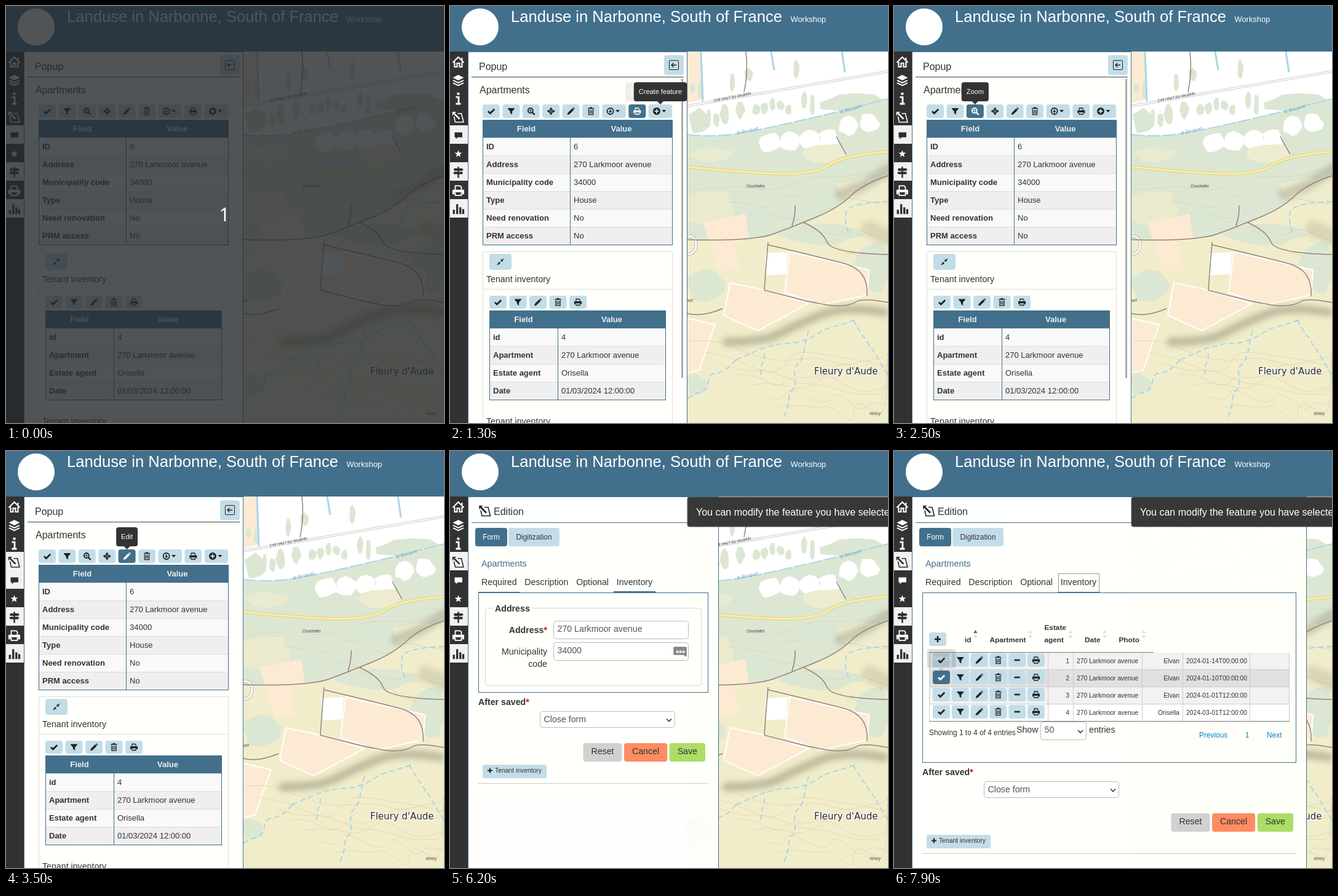
An HTML page that plays this animation: 712 by 678 pixels, repeating every 8 s.

```html
<!DOCTYPE html>
<html lang="en">
<head>
<meta charset="utf-8">
<title>Map editor</title>
<style>
html, body { margin: 0; width: 100%; height: 100%; overflow: hidden; background: #fff; }
svg { display: block; width: 100%; height: 100%; font-family: "Liberation Sans", Arial, sans-serif; }
text { white-space: pre; }
.map text { font-family: "Open Sans", "Noto Sans", sans-serif; font-style: italic; }
.map .town { font-family: "DejaVu Sans", sans-serif; font-style: normal; }
.ln { fill: none; stroke: currentColor; }
.btn { color: #222; }
.btn > rect { fill: #c3dde8; }
.btn.on { color: #fff; }
.btn.on > rect { fill: #42708c; }
.side { color: #fff; }
.side > rect { fill: none; }
.side.on { color: #2d2d2d; }
.side.on > rect { fill: #f1f1f1; }
</style>
</head>
<body>
<svg id="stage" viewBox="0 0 712 678"></svg>
<script>
const TEAL = '#42708c', LIGHT = '#c3dde8', INK = '#333', BASE = 14.2;
const ADDRESS = '270 Larkmoor avenue';
const END = 'text-anchor="end"', MID = 'text-anchor="middle"';

// ---- drawing helpers
const rect = (x, y, w, h, fill, extra = '') =>
  `<rect x="${x}" y="${y}" width="${w}" height="${h}" fill="${fill}" ${extra}/>`;
const frame = (x, y, w, h, stroke, r = 0, fill = 'none') =>
  rect(x + .5, y + .5, w - 1, h - 1, fill, `stroke="${stroke}" rx="${r}"`);
const text = (x, y, str, size = 13, fill = INK, extra = '') =>
  `<text x="${x}" y="${y}" font-size="${size}" fill="${fill}" ${extra}>${str}</text>`;
const bold = (x, y, str, size, fill, extra = '') =>
  text(x, y, str, size, fill, 'font-weight="bold" ' + extra);
const path = (d, fill, stroke = 'none', w = 1, extra = '') =>
  `<path d="${d}" fill="${fill}" stroke="${stroke}" stroke-width="${w}" ${extra}/>`;
const hline = (x1, x2, y, stroke, w = 1, extra = '') => rect(x1, y, x2 - x1, w, stroke, extra);
const group = (id, body) => `<g id="${id}">${body}</g>`;

const pen = document.createElement('canvas').getContext('2d');
function widthOf(str, size, weight = '') {
  pen.font = `${weight} ${size}px "Liberation Sans", Arial, sans-serif`;
  return pen.measureText(str).width;
}

// Smooth line through the midpoints of "x,y x,y ..."
function curve(pts) {
  const p = pts.split(' ').map(s => s.split(',').map(Number)), n = p.length;
  let d = 'M' + p[0];
  for (let i = 1; i < n - 1; i++) {
    const q = p[i], r = p[i + 1];
    d += `Q${q} ${i < n - 2 ? [(q[0] + r[0]) / 2, (q[1] + r[1]) / 2] : r}`;
  }
  return n === 2 ? d + 'L' + p[1] : d;
}
const trail = (pts, stroke, w, extra) => path(curve(pts), 'none', stroke, w, extra);
const poly = (pts, fill, stroke, w) => path('M' + pts.split(' ').join('L') + 'Z', fill, stroke, w);
const between = (a, b, fill) => path(curve(a) + curve(b.split(' ').reverse().join(' ')).replace('M', 'L') + 'Z', fill);

let seed = 11;
const rnd = () => (seed = seed * 16807 % 2147483647) / 2147483647;

// Ellipse with an uneven rim
function patch(x, y, rx, ry, fill) {
  let d = '';
  for (let a = 0; a < 12; a++) {
    const k = .8 + rnd() * .4, t = a * Math.PI / 6;
    d += (a ? 'L' : 'M') + (x + rx * k * Math.cos(t)).toFixed(1) + ' ' + (y + ry * k * Math.sin(t)).toFixed(1);
  }
  return path(d + 'Z', fill, fill, 3, 'stroke-linejoin="round"');
}

// Line between two points that wanders sideways
function wander(x1, y1, x2, y2, amp) {
  const pts = [];
  for (let i = 0; i <= 8; i++) {
    const k = i / 8, side = (rnd() - .5) * 2 * amp * Math.sin(Math.PI * k);
    pts.push(`${x1 + (x2 - x1) * k + side / 2},${y1 + (y2 - y1) * k + side}`);
  }
  return pts.join(' ');
}

// ---- icons, centred on 0,0
const ln = (d, w = 1.6) => `<path class="ln" d="${d}" stroke-width="${w}"/>`;
const solid = d => `<path fill="currentColor" fill-rule="evenodd" d="${d}"/>`;
const ring = (r, w, at = 0) => `<circle class="ln" cx="${at}" cy="${at}" r="${r}" stroke-width="${w}"/>`;
const spin = (n, body) => Array.from({ length: n }, (_, i) => `<g transform="rotate(${i * 360 / n})">${body}</g>`).join('');
const withCaret = body => `<g transform="translate(-6)">${body}${solid('M8.5-2h7l-3.5 4Z')}</g>`;
const ICON = {
  check: ln('M-5 .3L-1.6 3.6L5.2-3.2', 2.8),
  filter: solid('M-5.5-5h11v1L1.6 .5v5L-1.6 3V.5L-5.5-4Z'),
  zoom: ring(4, 1.9, -1) + ln('M2 2L5.8 5.8', 2.4) + ln('M-3-1H1M-1-3V1', 1.2),
  target: spin(4, solid('M0-6.5L2.4-3.6H-2.4Z')) + ring(2.9, 1.4) + ln('M0-5V5M-5 0H5', 1.2),
  pencil: solid('M-6 6l1-3.6l7-7L4.6-2l-7 7ZM2.7-5.3l1.3-1L6.3-4l-1 1.3Z'),
  trash: ln('M-5-4.5H5M-2-5.8H2M-3.6-3V5.6H3.6V-3M-1.3-2V4M1.3-2V4', 1.3),
  clock: withCaret(ring(5, 1.8) + ln('M0-3V1M-2 0L0 2L2 0', 1.4)),
  print: ln('M-3-2V-5H2L3-4V-2M-3 3V5H3V3', 1.3) + solid('M-6-1.5H6v5H4V2H-4v1.5H-6Z'),
  add: withCaret(ring(3, 6) + '<path d="M-3.4 0H3.4M0-3.4V3.4" stroke="#c3dde8" stroke-width="2"/>'),
  minus: ln('M-4.5 0H4.5', 2.6),
  plus: ln('M-5 0H5M0-5V5', 2.6),
  shrink: spin(2, solid('M.4-.4L.8-4.5L2.2-3.2L4.6-5.6l1 1L3.2-2.2L4.5-.8Z')),
  home: ln('M-9 1L0-8L9 1M6-7V-3M-6 0V8H-2V2H2V8H6V0', 2.1),
  layers: solid('M0-9l9 4.5L0 0l-9-4.5Z') + ln('M-8.5 0L0 4L8.5 0M-8.5 4.2L0 8.2L8.5 4.2', 2.1),
  info: solid('M-2-10h4v3.7h-4Z') + ln('M-4-2.7H.5V8M-4 8.2H4', 2.8),
  edit: ln('M-1-6H5L8.5 8H-5L-7-1', 1.6) + ln('M-8.5-7.5L2 3', 2.6) + ln('M-9-3V-8H-4', 1.4),
  chat: solid('M-6-5H6.5V3H-1L-4 6V3H-6Z'),
  star: spin(5, solid('M0-6.3L1.7-1.5L0 1L-1.7-1.5Z')),
  sign: ln('M0-9V9', 2.4) + solid('M-7-6.5H6l2.5 2L6-2.5H-7ZM7-.8H-6l-2.5 2l2.5 2H7Z'),
  printer: ln('M-5-1V-8H3l2 2V-1M-5 3V7.5H5V3', 1.8) + solid('M-9.5-1.5h19V6H6V2.5H-6V6H-9.5Z'),
  bars: ln('M-7.2 8V1M-1.8 8V-8M3.3 8V-3M8 8V0', 3.3)
};
const icon = (name, x, y, k = 1) => `<g transform="translate(${x} ${y}) scale(${k})">${ICON[name]}</g>`;
const button = (x, y, w, h, name, id = '') =>
  `<g class="btn" id="${id}">${rect(x, y, w, h, LIGHT, 'rx="4"')}${icon(name, x + w / 2, y + h / 2)}</g>`;

// ---- background map
function map() {
  const GREEN = '#dce7d3', CREAM = '#f1edcb', PEACH = '#fdead3', PATH = '#93827f', BLUE = '#a9d6e8';
  const river = '386,209 430,214 510,200 632,172 712,151';
  const road = '386,261 440,268 590,276 640,242 712,237';
  const lane = '386,380 492,383 560,358 632,328 670,290 712,276';
  let s = rect(30, 74, 682, 604, '#fff') + rect(386, 262, 326, 416, CREAM) + rect(30, 262, 356, 416, '#f8f6e4');
  s += poly('386,74 409,74 411,152 386,158', PEACH);

  // hedges on both sides of the diagonal street
  const streetY = x => 161 - (x - 386) * .172;
  for (let x = 394; x < 600; x += 13) {
    const side = rnd() < .5 ? -1 : 1;
    s += patch(x, streetY(x) + side * (18 + rnd() * 18), 2 + rnd() * 4, 6 + rnd() * 10, GREEN);
  }
  s += patch(405, 188, 16, 18, GREEN) + patch(660, 158, 55, 14, GREEN);

  // land between river, road and lane
  s += between(river, road, GREEN) + patch(425, 242, 36, 10, '#e9ebd0');
  for (let x = 520; x < 710; x += 32) s += patch(x, 240 - (x - 500) * .2 - rnd() * 16, 15, 14, '#fff');
  s += patch(610, 240, 32, 14, '#eeecd0');
  s += between(road, lane, GREEN) + patch(425, 330, 42, 28, '#eceacd') + patch(670, 300, 40, 18, '#eeedd0');
  s += patch(600, 372, 60, 16, GREEN) + patch(688, 425, 26, 44, GREEN) + patch(415, 452, 32, 24, GREEN) + patch(400, 615, 16, 16, GREEN);

  // fields
  s += poly('412,352 480,338 486,378 462,384 470,428 436,432', PEACH) + poly('512,402 549,400 546,436 514,438', '#fff');
  const field = pts => poly(pts, PEACH, '#fff', 2);
  s += field('552,400 681,429 678,470 604,486 544,466') + field('455,450 512,462 582,484 500,528 445,503') + field('386,508 431,518 405,592 386,596');

  // contour lines
  for (let i = 0; i < 7; i++)
    s += trail(wander(390 + i * 24, 545 + i * 18, 712, 570 + i * 16, 34) + (i % 2 ? '' : ' 712,560'), '#e6d8b3', 1);
  for (let i = 0; i < 4; i++) s += trail(wander(390 + i * 60, 300 + i * 18, 712, 262 + i * 60, 22), '#e3d6b0', 1);

  // shading along the ridges
  const ridge = (pts, w, o) => trail(pts, '#6f6a55', w, `opacity="${o}" stroke-linecap="round"`);
  s += '<g filter="url(#soft)">' + ridge('450,546 510,546 560,520 640,486 706,498', 14, .38) +
    ridge('635,306 670,296 712,266', 18, .28) + ridge('682,362 712,376', 26, .18) + '</g>';

  // water
  for (const c of ['408,74 411,155', '522,74 527,104', '637,74 642,108']) s += trail(c, BLUE, 3);
  s += trail(river, BLUE, 2, 'stroke-dasharray="22 3"');
  for (const c of [wander(386, 638, 465, 575, 8), wander(465, 575, 660, 510, 8), wander(543, 668, 584, 525, 10),
    wander(505, 600, 512, 560, 4), '712,318 648,320 640,350 650,374', wander(655, 510, 712, 600, 14)])
    s += trail(c, BLUE, 2, 'stroke-dasharray="9 5"');

  // roads
  const cased = (pts, edge, fill, w) => trail(pts, edge, w + 1.6) + trail(pts, fill, w);
  s += cased(road, '#d3c68b', '#f8ef9f', 3.4) + cased('386,404 400,402 400,374 386,374', '#aaa', '#fff', 3);
  s += path(`M386 161L712 ${streetY(712)}m0 3L386 164`, 'none', '#cfcac8', 1.1);
  for (const c of [lane, '481,74 485,108 478,140', '628,212 634,224 644,241', '556,358 562,338 561,324',
    '517,384 514,420 511,462', '516,388 600,408 681,429 678,472', '511,462 604,487 650,488 670,474 712,482',
    '386,500 410,506 443,492', '575,352 606,366 620,402 712,404']) s += trail(c, PATH, 1.5);

  // labels
  const label = (x, y, r, str, size, fill = INK) => text(x, y, str, size, fill, `transform="rotate(${r} ${x} ${y})"`);
  s += label(429, 156, -11, 'CHE HAUT DU VALBRIN', 6.2) + label(467, 209, -13, 'le Bouquet', 7.5, '#6aa0c8') +
    label(635, 175, -17, 'le Bouquet', 7.5, '#6aa0c8') + label(482, 295, 0, 'Coustades', 6.6) +
    label(682, 665, 0, 'Villory', 6.6) + label(386, 481, 0, 'set', 7);
  s += text(592, 599, "Fleury d'Aude", 15, '#2a2a33', 'class="town" stroke="#fff" stroke-width="2.5" stroke-opacity=".7" paint-order="stroke"');
  return `<g class="map">${s}</g>`;
}

// ---- page parts
const panel = (right, bottom) => rect(30, 75, right - 30, 603, '#fff', 'opacity=".88"') +
  rect(30, 117, right - 30, bottom - 117, '#fffffb', 'opacity=".8"') + frame(29, 74, right - 28, 610, TEAL);

function dataTable(x, y, w, split, data) {
  const rows = Object.entries(data), h = 29 * (rows.length + 1);
  let s = '';
  rows.forEach(([k, v], i) => {
    const top = y + 29 * (i + 1);
    s += rect(x, top, w, 29, i % 2 ? '#efefef' : '#f9f9f9') + hline(x, x + w, top, '#ddd');
    s += bold(x + 6, top + 19, k) + text(split + 6, top + 19, v);
  });
  s += rect(x, y, w, 29, TEAL) + rect(split, y, 1, h, TEAL) + frame(x, y, w, h + 1, TEAL);
  return s + bold((x + split) / 2, y + 19, 'Field', 13, '#eee', MID) + bold((split + x + w) / 2, y + 19, 'Value', 13, '#eee', MID);
}

// Main toolbar: icon, tooltip; menus with a caret are wider
const TOOLS = Object.entries({ check: 'Select', filter: 'Filter', zoom: 'Zoom', target: 'Center', pencil: 'Edit',
  trash: 'Delete', clock: 'Export', print: 'Print', add: 'Create feature' }).map(([name, tip]) =>
  ({ name, tip, w: ICON[name].includes('translate') ? 38.5 : 28 }));
TOOLS.reduce((x, b) => (b.x = x) + b.w + 4.4, 53);

const toolRow = (x, y, step, h, names, idOf = () => '') =>
  names.split(' ').map((n, i) => button(x + i * step, y, 28, h, n, idOf(i))).join('');

function popup() {
  let s = panel(385, 678) + text(47, 104, 'Popup', 16) + hline(35, 380, 115, '#444');
  s += rect(348, 80, 32, 32, LIGHT, 'rx="4"') + frame(356, 88, 16, 16, '#222', 1.5) + path('M368 96h-8m3.5-3.5l-3.5 3.5l3.5 3.5', 'none', '#222', 1.3);
  s += text(48, 142, 'Apartments', 16) + TOOLS.map(b => button(b.x, 160, b.w, 22, b.name, b.name)).join('');
  s += dataTable(53, 185, 309, 195, { ID: 6, Address: ADDRESS, 'Municipality code': 34000,
    Type: 'House', 'Need renovation': 'No', 'PRM access': 'No' });
  s += frame(53, 399, 309, 290, '#ddd') + button(64, 403, 36, 26, 'shrink');
  s += text(59, 449, 'Tenant inventory', BASE) + hline(54, 361, 460, '#ddd');
  s += toolRow(64, 471, 32.5, 21, 'check filter pencil trash print');
  s += dataTable(64, 495, 287, 175, { id: 4, Apartment: ADDRESS, 'Estate agent': 'Orisella', Date: '01/03/2024 12:00:00' });
  return s + text(59, 680, 'Tenant inventory', BASE) + rect(376, 118, 3, 487, '#aaa', 'rx="1.5" id="thumb"');
}

const star = '<tspan fill="#e00">*</tspan>';
const input = (x, y, w, h, str) => frame(x, y, w, h, '#bbb', 4, '#fff') + text(x + 6.5, y + 18, str, BASE, '#555');
const select = (x, y, w, h, str) => input(x, y, w, h, str) + path(`M${x + w - 14} ${y + h / 2 - 1}l4 4l4-4`, 'none', INK, 1.6);

// Lower part of the form, below its box
function formFoot(right, y) {
  let x = right - 5, s = '';
  for (const [str, fill] of [['Save', '#acdd66'], ['Cancel', '#fd8c62'], ['Reset', '#d1d1d1']]) {
    const w = widthOf(str, BASE) + 26;
    x -= w;
    s += rect(x, y + 82, w, 30, fill, 'rx="4"') + text(x + w / 2, y + 100, str, BASE, INK, MID);
    x -= 3.5;
  }
  return s + bold(46, y + 20, 'After saved' + star, BASE) + select(146, y + 30, 220, 27, 'Close form') +
    rect(53, y + 117, 104, 22, LIGHT, 'rx="3"') + `<g color="#222">${icon('plus', 65, y + 126.5, .8)}</g>` +
    text(73, y + 130, 'Tenant inventory', 10.35) + hline(46, right, y + 147, '#ccc');
}

// Tabs sit side by side; the line under a tab reaches 5px past its name
const TABS = ['Required', 'Description', 'Optional', 'Inventory'].map(name => ({ name, w: widthOf(name, BASE) }));
TABS.reduce((x, t) => (t.x = x) + t.w + 12.8, 51);
const underline = (i, y, id = '') => hline(TABS[i].x - 5, TABS[i].x + TABS[i].w + 5, y, TEAL, 2, `id="${id}"`);

const formHead = () => `<g color="#222">${icon('edit', 57, 97.5)}</g>` + text(71, 104, 'Edition', 16) + hline(35, 386, 116, TEAL) +
  rect(41, 125, 52, 30, TEAL, 'rx="4"') + text(67, 144, 'Form', 11.9, '#fff', MID) +
  rect(95, 125, 83, 30, LIGHT, 'rx="4"') + text(136.5, 144, 'Digitization', 11.9, INK, MID) +
  text(51, 188, 'Apartments', BASE + .2, TEAL) + TABS.map(t => text(t.x, 218, t.name, BASE)).join('');

function required() {
  return frame(46, 230, 374, 163, TEAL) + frame(57, 255, 352, 127, LIGHT, 4) + rect(69, 252, 65, 6, '#fefefb') +
    bold(73, 261, 'Address', BASE) + bold(158, 296, 'Address' + star, BASE, INK, END) + input(168, 276, 220, 30, ADDRESS) +
    text(158, 331, 'Municipality', BASE, INK, END) + text(158, 351, 'code', BASE, INK, END) + input(168, 311, 220, 30, '34000') +
    path('M364 319h20v15l-4-3h-16Z', '#888', '#666', 1, 'stroke-linejoin="round"') + bold(374.5, 333, '***', 13, '#fff', MID) +
    underline(0, 229) + formFoot(420, 393);
}

const ROWS = [['Elvan', '2024-01-14T00'], ['Elvan', '2024-01-10T00'], ['Elvan', '2024-01-01T12'], ['Orisella', '2024-03-01T12']];

function inventory() {
  let s = frame(46, 230, 608, 277, TEAL) + button(57, 295, 28, 22, 'plus'), x = 115;
  for (const head of ['id', 'Apartment', 'Estate agent', 'Date', 'Photo']) {
    const words = head.split(' ').reverse();
    words.forEach((w, i) => s += bold(x, 311 - i * 20, w, 11.8));
    const ax = x + Math.max(...words.map(w => widthOf(w, 11.8, 'bold'))) + 7;
    s += path(`M${ax - 3} 296l3-5l3 5Z`, head === 'id' ? '#555' : '#ddd') + path(`M${ax - 3} 300l3 5l3-5Z`, '#ddd');
    x = ax + 23;
  }
  ROWS.forEach(([agent, date], i) => {
    const y = 328 + i * 28;
    s += rect(57, y, 586, 28, '#fff', `id="row${i}"`) + hline(57, 643, y + 27, '#ccc');
    s += toolRow(63, y + 1, 30.8, 22, 'check filter pencil trash minus print', j => j ? '' : 'pick' + i);
    s += text(285, y + 17, i + 1, 10.3, INK, END) + text(297, y + 17, ADDRESS, 10.3) +
      text(464, y + 17, agent, 10.3, INK, END) + text(475, y + 17, date + ':00:00', 10.3);
  });
  for (const edge of [57, 250, 291, 403, 469, 578, 642]) s += rect(edge, 328, 1, 112, '#ccc');
  s += hline(57, 422, 327, '#777') + hline(57, 643, 439, '#777');
  s += text(57, 462, 'Showing 1 to 4 of 4 entries', 11.9) + text(199, 458, 'Show', BASE) +
    select(238, 440, 75, 30, '50') + text(317, 458, 'entries', BASE);
  s += text(496, 466, 'Previous', 11.9, '#08c') + text(571, 466, '1', 11.9, '#08c') + text(606, 466, 'Next', 11.9, '#08c');
  s += rect(267.5, 199.5, 66, 30, 'none', 'stroke="#333" stroke-dasharray="1 1" id="focus"') + underline(3, 229);
  return s + formFoot(654, 507);
}

function tip(id, x, y, str) {
  const w = widthOf(str, 11) + 16;
  return group(id, rect(x - w / 2, y, w, 31, INK, 'rx="4"') + path(`M${x - 5} ${y + 31}h10l-5 5Z`, INK) +
    text(x, y + 19, str, 11, '#fff', MID));
}

const SIDE = ['home', 'layers', 'info', 'edit', 'chat', 'star', 'sign', 'printer', 'bars'];
const chrome = rect(0, 0, 712, 74, TEAL) + '<circle cx="49" cy="34" r="30" fill="#fff"/>' +
  text(99, 26, 'Landuse in Narbonne, South of France', 25.6, '#fff') + text(553.5, 26, 'Workshop', 12.9, '#fff') +
  rect(0, 74, 29, 604, '#323232') + SIDE.map((n, i) =>
    `<g class="side" id="side-${n}">${rect(0, 74 + i * 30, 29, 30, 'none')}${icon(n, 13.5, 91 + i * 29.9)}</g>`).join('');

const stage = document.getElementById('stage');
stage.innerHTML = '<defs><filter id="soft" x="-20%" y="-20%" width="140%" height="140%"><feGaussianBlur stdDeviation="5"/></filter></defs>' +
  map() + group('popup', popup()) +
  group('form', group('required', panel(436, 561) + required()) + group('inventory', panel(670, 675) + inventory()) + formHead() +
    underline(1, 228, 'overDescription') + underline(3, 228, 'overInventory') +
    rect(386, 75, 340, 48, '#383838', 'rx="3" stroke="#555"') + text(400, 105, 'You can modify the feature you have selected', 16, '#fff')) +
  chrome +
  TOOLS.map(b => tip('tip-' + b.name, b.x + b.w / 2, 124, b.tip)).join('') +
  [0, 1].map(i => tip('pickTip' + i, 77, 294 + i * 28, 'Select')).join('') +
  group('dim', rect(0, 0, 712, 678, 'rgb(38,42,46)', 'opacity=".8"') +
    text(355, 350, '1', 30, '#fff', MID + ' style="font-family:\'Noto Sans\',sans-serif"'));

// ---- timeline
const el = id => document.getElementById(id);
const show = (id, on) => el(id).style.display = on ? '' : 'none';
const fade = (id, o) => { show(id, o > 0); el(id).style.opacity = o; };
const lit = (id, on) => el(id).classList.toggle('on', on);
const within = (t, a, b) => t >= a && t < b;

// When the pointer reaches each tool; it stays until the next stop
const STOPS = Object.entries({ 1000: 'add', 1300: 'print', 1500: 'trash', 1600: 'pencil', 1700: 'zoom',
  1900: 'filter', 2300: 'zoom', 2600: 'target', 2800: 'pencil', 3700: '' });
const toolAt = t => (STOPS.filter(([at]) => at <= t).pop() || [0, ''])[1];

// A tooltip is faint on arrival, then solid, and lingers one step
function tipAlpha(name, t) {
  const now = toolAt(t) === name, before = toolAt(t - 100) === name;
  if (now) return before ? 1 : .08;
  return before && toolAt(t - 200) === name && t < 3700 ? 1 : 0;
}

function draw(t) {
  const form = t >= 3700, inv = t >= 6900;
  show('dim', t < 100);
  show('popup', !form);
  show('form', form);
  show('required', !inv);
  show('inventory', inv);
  for (const n of SIDE)
    lit('side-' + n, n === 'sign' || n === 'bars' || (n === 'chat' && !form) || (n === 'edit' && t >= 3500));

  const wide = within(t, 600, 700) ? 8 : 3;
  show('thumb', within(t, 300, 3400));
  el('thumb').setAttribute('x', 379 - wide);
  el('thumb').setAttribute('width', wide);

  for (const { name } of TOOLS) {
    lit(name, toolAt(t) === name);
    fade('tip-' + name, tipAlpha(name, t));
  }

  show('overDescription', within(t, 4600, 4700));
  show('overInventory', within(t, 6200, 6900));
  show('focus', t >= 7500);
  const picked = t < 7700 ? -1 : t < 7900 ? 0 : 1;
  ROWS.forEach((_, i) => {
    lit('pick' + i, picked === i);
    el('row' + i).setAttribute('fill', picked === i ? '#e0e0e0' : i % 2 ? '#fff' : '#f2f2f2');
  });
  fade('pickTip0', picked === 0 ? (t < 7800 ? .16 : 1) : 0);
  fade('pickTip1', picked === 1 ? .16 : 0);
}

const start = performance.now();
let last = -1;
function tick() {
  const t = Math.floor((performance.now() - start) % 8000 / 100) * 100;
  if (t !== last) draw(last = t);
  requestAnimationFrame(tick);
}
tick();
</script>
</body>
</html>
```
